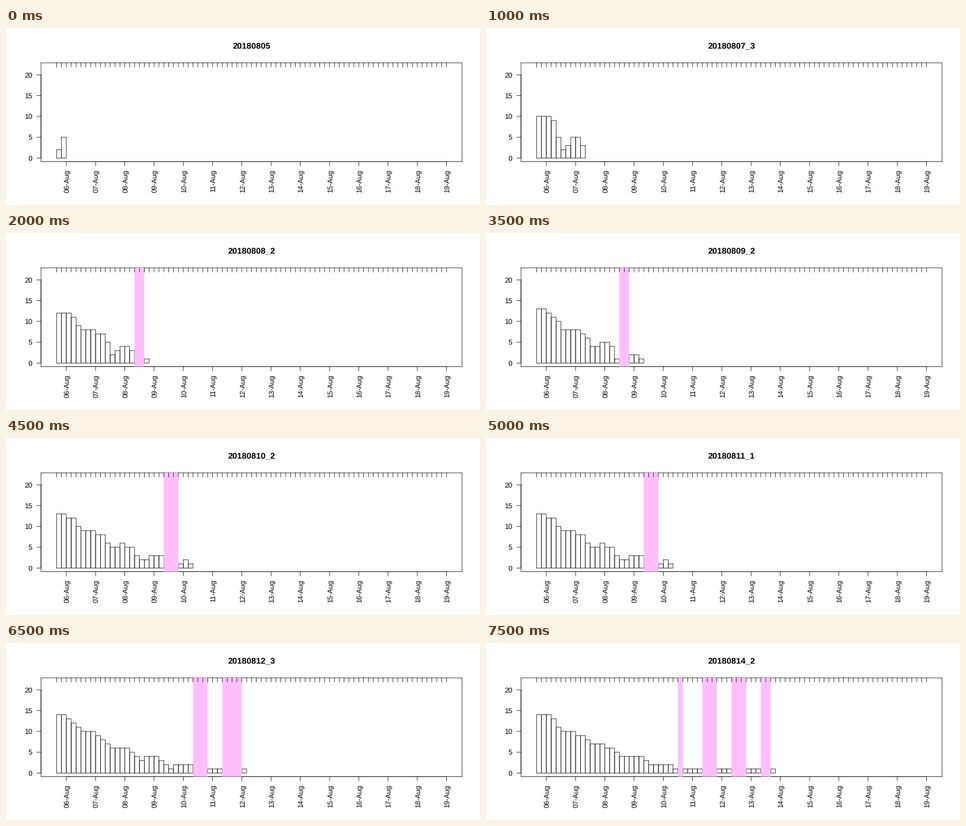
These frames come from a looping animation (800 px wide and 300 px high, 8000 ms). A matplotlib script:

```python
import matplotlib.pyplot as plt
import numpy as np
from matplotlib.animation import FuncAnimation
from matplotlib.collections import LineCollection, PolyCollection
from matplotlib.patches import Rectangle

plt.rcParams["font.family"] = "Liberation Sans"
plt.rcParams["text.hinting"] = "none"

W, H, DPI = 800, 300, 100
PX = 72 / DPI
LINE = 0.75 * PX
LEFT, RIGHT, TOP, BOTTOM = 59.04, 769.76, 59.04, 226.56
BINS, Y_MAX, TICK = 80, 22, 7.2
PAD = 0.04 / 1.08

RELEASES = ("05 06_1 07_3 08_1 08_2 08_3 09_1 09_2 "
            "10_1 10_2 11_1 12_1 12_2 12_3 14_1 14_2").split()
DARK = RELEASES.index("08_1")

# Number of four-hour bins reached at some of the releases
REACH = {0: 2, 1: 2, 2: 10, 4: 19, 6: 19, 9: 28, 10: 28, 11: 35,
         12: 39, 13: 39, 14: 49}


def bin_x(i):
    span = RIGHT - LEFT
    return LEFT + span * PAD + i * span / 1.08 / BINS


def count_y(n):
    span = BOTTOM - TOP
    return BOTTOM - span * PAD - n * span / 1.08 / Y_MAX


def rect(x0, y0, x1, y1):
    return [(x0, y0), (x0, y1), (x1, y1), (x1, y0)]


def counts_at(k):
    """Decaying counts that fill in with age and dip once a day."""
    reach = int(np.ceil(np.interp(k, list(REACH), list(REACH.values()))))
    i = np.arange(reach)
    age = reach - i
    level = 15.5 * np.clip(1 - i / 45, 0, 1) ** 2.5
    filled = 1 - np.exp(-np.sqrt(age / 8))
    night = (0.5 + 0.5 * np.cos(2 * np.pi * (i - 5) / 6)) ** 2
    dip = night * (1.2 + 11 * np.exp(-age / 5))
    counts = np.floor(np.maximum(level * filled + 1.4 - dip, 0)).astype(int)
    counts[-1] = max(counts[-1], 1)
    return counts


def bars_of(counts):
    return [rect(bin_x(i), count_y(0), bin_x(i + 1), count_y(counts[i]))
            for i in np.flatnonzero(counts)]


def gaps_of(counts):
    """Bands over the empty bins between filled ones."""
    filled = np.flatnonzero(counts)
    return [rect(bin_x(a + 1), TOP, bin_x(b), BOTTOM)
            for a, b in zip(filled, filled[1:]) if b > a + 1]


fig = plt.figure(figsize=(W / DPI, H / DPI), dpi=DPI)
ax = fig.add_axes([0, 0, 1, 1])
ax.set(xlim=(0, W), ylim=(H, 0))
ax.axis("off")


def add(art):
    art.set_snap(False)
    return ax.add_collection(art, autolim=False)


def add_lines(segments, z):
    return add(LineCollection(segments, colors="black", linewidths=LINE,
                              capstyle="round", zorder=z))


days = [(bin_x(2 + 6 * k), f"{6 + k:02d}-Aug") for k in range(14)]
levels = range(0, 21, 5)

paper = ax.add_patch(Rectangle((0, 0), W, H, lw=0, zorder=0))
bars = add(PolyCollection([], facecolors="none", edgecolors="black",
                          linewidths=LINE, zorder=1))
gaps = add(PolyCollection([], linewidths=0, zorder=3))

frame = [rect(LEFT, TOP, RIGHT, BOTTOM) + [(LEFT, TOP)],
         [(LEFT, count_y(0)), (LEFT, count_y(20))],
         [(days[0][0], BOTTOM), (days[-1][0], BOTTOM)]]
frame += [[(LEFT, count_y(n)), (LEFT - TICK, count_y(n))] for n in levels]
frame += [[(x, BOTTOM), (x, BOTTOM + TICK)] for x, _ in days]
add_lines(frame, 2)
add_lines([[(bin_x(i), TOP), (bin_x(i), TOP + TICK)]
           for i in range(BINS + 1)], 4)

label = dict(fontsize=12 * PX, ha="right", va="baseline",
             rotation_mode="anchor")
for n in levels:
    ax.text(LEFT - 14.4, count_y(n) + 4.2, str(n), **label)
for x, day in days:
    ax.text(x + 4.2, BOTTOM + 13.4, day, rotation=90, **label)
title = ax.text((LEFT + RIGHT) / 2, 35, "", fontsize=14.4 * PX,
                weight="bold", ha="center", va="baseline")


def draw(k):
    dark = k == DARK
    counts = counts_at(k)
    paper.set_facecolor("#373737" if dark else "white")
    gaps.set_facecolor("#2e2e2e" if dark else "#ffbfff")
    gaps.set_verts(gaps_of(counts))
    bars.set_verts(bars_of(counts))
    title.set_text("201808" + RELEASES[k])
    return paper, gaps, bars, title


anim = FuncAnimation(fig, draw, frames=len(RELEASES), interval=500,
                     repeat=True, repeat_delay=0)
plt.show()
```
